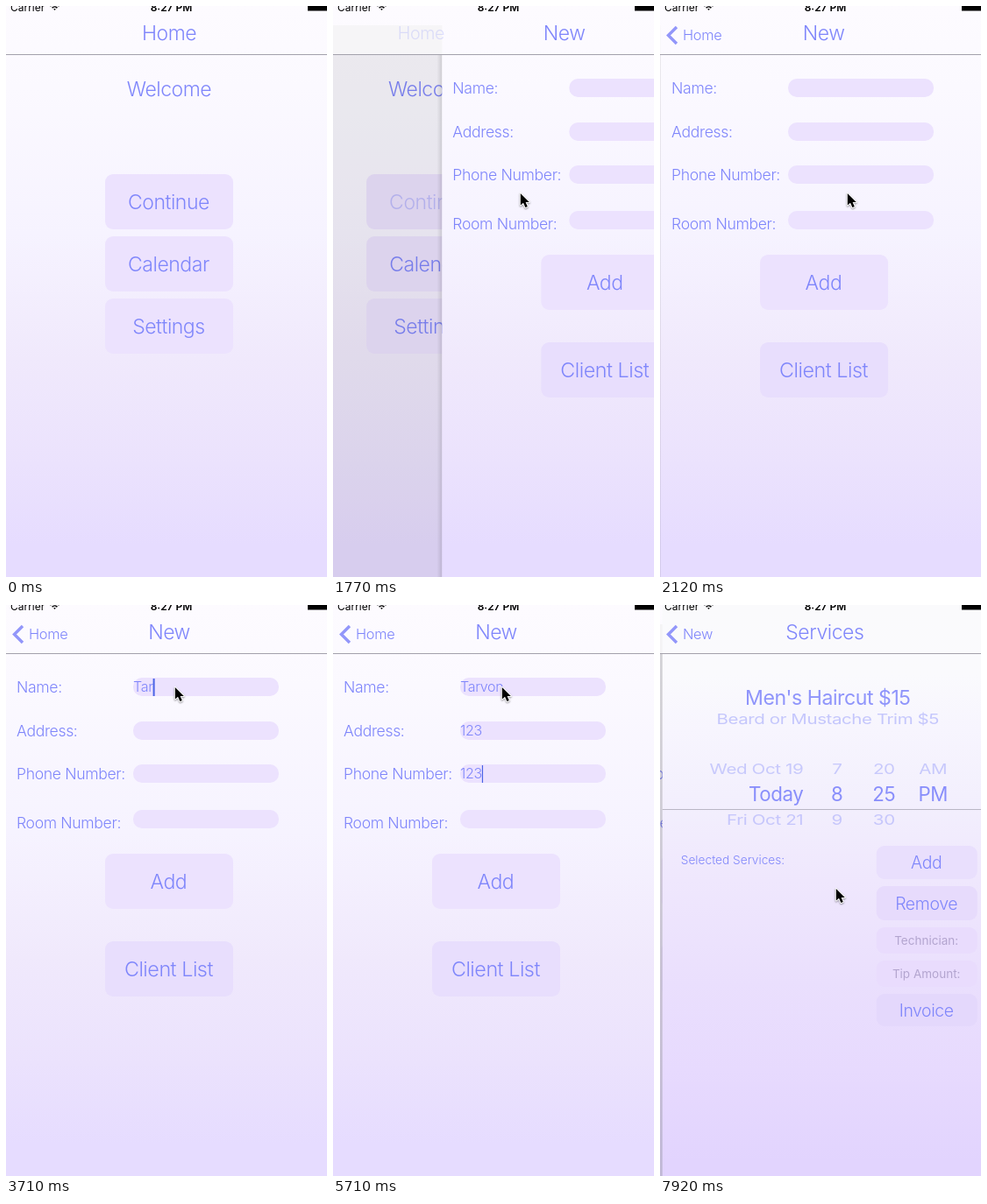
Animation, 366 px wide and 652 px high, one loop 8 s. Source, as an HTML page with a canvas:

```html
<!DOCTYPE html>
<html lang="en">
<head>
<meta charset="utf-8">
<title>Booking app</title>
<style>
html, body { margin: 0; width: 100%; height: 100%; overflow: hidden; background: #fcfaff; }
canvas { display: block; width: 366px; height: 652px; }
</style>
</head>
<body>
<canvas id="stage" width="366" height="652"></canvas>
<script>
const W = 366, H = 652, LOOP = 8000, SCREEN = 375;
const ctx = document.getElementById('stage').getContext('2d');
const INK = '#7f86fb', FILL = '#ece2fe';
const clamp = v => Math.max(0, Math.min(1, v));

const STEP = 87.8, PHASE = 715;
const tick = t => PHASE + STEP * Math.floor((t - PHASE + 1) / STEP);

const PUSH_NEW = 1583.5, PUSH_SERVICES = 7442;

// Remaining distance of a pushed page, settling like a damped spring.
function pushX(ms) {
  if (ms <= 0) return SCREEN;
  const u = ms * 0.0186;
  return SCREEN * (1 + u + u * u / 2) * Math.exp(-u);
}

function gradient(stops) {
  const g = ctx.createLinearGradient(0, 0, 0, H);
  for (const [y, color] of stops) g.addColorStop(y / H, color);
  return g;
}
const LILAC = gradient([[0, '#fdfbff'], [92, '#fbf9ff'], [260, '#f6f3ff'],
  [403, '#f0e9fc'], [524, '#ebe2fd'], [616, '#e6dcff']]);
const VIOLET = gradient([[0, '#fafafc'], [80, '#fafafd'], [142, '#f7f5fe'], [216, '#f3f0fd'],
  [315, '#efe7fd'], [432, '#eadffd'], [530, '#e7dafe'], [635, '#e2d4fe']]);

function text(str, x, y, size, o = {}) {
  ctx.save();
  ctx.font = `${o.weight || 300} ${size}px Inter, "Open Sans", sans-serif`;
  ctx.letterSpacing = (o.track ?? -0.02) * size + 'px';
  ctx.textAlign = o.align || 'center';
  ctx.fillStyle = o.color || INK;
  ctx.globalAlpha *= o.alpha ?? 1;
  ctx.translate(x, y);
  ctx.scale(1, o.squash || 1);
  ctx.fillText(str, 0, size * 0.364);
  const width = ctx.measureText(str).width;
  ctx.restore();
  return width;
}

function pill(x, y, w, h, r, color = FILL) {
  ctx.fillStyle = color;
  ctx.beginPath();
  ctx.roundRect(x, y, w, h, r);
  ctx.fill();
}

function button(label, x, y, w, h, size, o = {}) {
  pill(x, y, w, h, 9, o.fill);
  text(label, x + w / 2 - 0.6, y + h / 2, size, o);
}

function backdrop(fill) {
  ctx.fillStyle = fill;
  ctx.fillRect(0, 0, SCREEN, H);
}

function home(t) {
  backdrop(LILAC);
  text('Welcome', 186, 95, 23);
  button('Continue', 113, 192, 146, 63, 23, { alpha: t >= 1430 ? 0.4 : 1 });
  button('Calendar', 113, 263, 146, 63, 23);
  button('Settings', 113, 334, 146, 63, 23);
}

const FIELDS = [
  { label: 'Name:', y: 93.5, value: 'Tarvon', on: 3010, off: 4480, caret: 2,
    keys: [3280, 3630, 3710, 3860, 3940, 4120] },
  { label: 'Address:', y: 143.5, value: '123', on: 4480, off: 5270, caret: 1.5,
    keys: [4830, 4830, 5010] },
  { label: 'Phone Number:', y: 192.5, value: '123', on: 5270, off: 6070, caret: 1.2,
    keys: [5540, 5630, 5710] },
  { label: 'Room Number:', y: 244.5, drop: 4, value: '123', on: 6070, off: 6800, caret: 1.2,
    keys: [6240, 6420, 6510] }
];

function client(t) {
  backdrop(LILAC);
  for (const f of FIELDS) {
    text(f.label, 12, f.y + (f.drop || 0), 17.6, { align: 'left' });
    pill(145, f.y - 10.5, 166, 21, 10);
    const typed = f.value.slice(0, f.keys.filter(k => t >= k).length);
    const w = text(typed, 145, f.y, 16, { align: 'left' });
    if (t >= f.on && t < f.off) {
      ctx.fillStyle = '#4a63e6';
      ctx.fillRect(145 + w, f.y - 9.5, f.caret, 20);
    }
  }
  button('Add', 113, 284, 146, 63, 23, { alpha: t >= 7300 ? 0.25 : 1 });
  button('Client List', 113, 384, 146, 63, 23.3, { fill: '#e8defd' });
}

const REELS = [
  ['Wed Oct 19', 'Today', 'Fri Oct 21', 160.5, 'right'],
  ['7', '8', '9', 199, 'center'],
  ['20', '25', '30', 252.5, 'center'],
  ['AM', 'PM', '', 308.5, 'center']
];

function services() {
  backdrop(VIOLET);
  text("Men's Haircut $15", 188.5, 106, 23.1, { weight: 400, alpha: 0.88 });
  text('Beard or Mustache Trim $5', 188.5, 130, 20.5, { weight: 400, squash: 0.8, alpha: 0.42 });

  ctx.save();
  ctx.beginPath();
  ctx.rect(0, 170, SCREEN, 82);
  ctx.clip();
  for (const [above, now, below, x, align] of REELS) {
    const side = { align, weight: 400, squash: 0.8, alpha: 0.38 };
    text(above, x, 187, 20.6, side);
    text(now, x, 216, 22.3, { align, weight: 400, alpha: 0.92 });
    text(below, x, 245.5, 20.6, side);
  }
  ctx.restore();
  ctx.fillStyle = '#b9b6c4';
  ctx.fillRect(0, 233, SCREEN, 1);

  text('Selected Services:', 21, 291.5, 13.7, { align: 'left', track: 0 });
  const hint = { fill: '#e9dcfd', color: '#b3a5cf', weight: 400, track: 0 };
  button('Add', 244, 275, 115, 38, 19.5, { fill: '#e9dffd' });
  button('Remove', 244, 321, 115, 39, 19.5, { fill: '#e7dbfc' });
  button('Technician:', 244, 368, 115, 30, 13.5, hint);
  button('Tip Amount:', 244, 406, 115, 30, 13.5, hint);
  button('Invoice', 244, 444, 115, 37, 19.4, { fill: '#e4d8fc' });
}

function back(label, alpha) {
  ctx.save();
  ctx.globalAlpha = alpha;
  ctx.strokeStyle = '#9296fa';
  ctx.lineWidth = 3.4;
  ctx.beginPath();
  ctx.moveTo(19, 24);
  ctx.lineTo(9.5, 33.5);
  ctx.lineTo(19, 43);
  ctx.stroke();
  text(label, 26, 33.5, 16.4, { align: 'left' });
  ctx.restore();
}

function shifted(x, draw, t) {
  ctx.save();
  ctx.translate(x, 0);
  draw(t);
  ctx.restore();
}

const PAGES = [
  { title: 'Home', draw: home },
  { title: 'New', draw: client, prev: 'Home' },
  { title: 'Services', draw: services, prev: 'New' }
];

function still(page, t) {
  page.draw(t);
  text(page.title, 186, 31, 23);
  if (page.prev) back(page.prev, 1);
}

function push(from, to, x, t) {
  const p = 1 - x / SCREEN, edge = clamp(x / 3);
  shifted(-112 * p, from.draw, t);
  ctx.fillStyle = `rgba(0,0,0,${0.1 * p * edge})`;
  ctx.fillRect(0, 55, W, H);
  ctx.fillStyle = `rgba(243,243,244,${p * edge})`;
  ctx.fillRect(0, 22, W, 33);
  if (from.prev) back(from.prev, clamp(1 - 2 * p));

  const shade = ctx.createLinearGradient(x - 6, 0, x, 0);
  shade.addColorStop(0, 'rgba(0,0,0,0)');
  shade.addColorStop(1, `rgba(0,0,0,${0.12 * edge})`);
  ctx.fillStyle = shade;
  ctx.fillRect(x - 6, 55, 6, H);

  shifted(x, to.draw, t);
  // The old title shrinks and fades towards the back label.
  text(from.title, 186 - 128 * p, 31, 23 - 5 * p, { alpha: clamp(1 - 1.15 * p) });
  text(to.title, 186 + 0.65 * x * p ** 0.1, 31, 23);
  back(to.prev, clamp((p - 0.7) / 0.28));
}

function statusBar() {
  const o = { color: '#000', weight: 400, track: 0 };
  text('Carrier', 5, 1.5, 12, { ...o, align: 'left' });
  text('8:27 PM', 188.5, 1.5, 12, { ...o, weight: 600 });
  ctx.fillStyle = '#000';
  ctx.fillRect(344, 0, 22, 5.5);
  ctx.strokeStyle = '#000';
  ctx.lineWidth = 1.6;
  for (const r of [1, 4, 7]) {
    ctx.beginPath();
    ctx.arc(55.5, 5, r, -Math.PI * 0.76, -Math.PI * 0.24);
    ctx.stroke();
  }
  ctx.fillStyle = '#a3a1ab';
  ctx.fillRect(0, 55, W, 1);
}

const PATH = [
  [715, 329, 286], [898, 329, 286], [1159, 213, 213], [2120, 213, 213], [2208, 211, 172],
  [2295, 197, 112], [2383, 192, 93], [6590, 192, 93], [6850, 203, 190], [7205, 200, 323]
];

function pointer(t) {
  if (t < PATH[0][0]) return;
  let [, x, y] = PATH[PATH.length - 1];
  const i = PATH.findIndex(p => p[0] > t);
  if (i > 0) {
    const [t0, x0, y0] = PATH[i - 1], [t1, x1, y1] = PATH[i];
    const k = (t - t0) / (t1 - t0);
    x = x0 + (x1 - x0) * k;
    y = y0 + (y1 - y0) * k;
  }
  ctx.save();
  ctx.translate(x + 0.8, y + 1);
  ctx.beginPath();
  for (const [px, py] of [[0, 0], [0, 13.6], [3.2, 10.7], [5.6, 16], [8, 15], [5.8, 10], [10, 10]])
    ctx.lineTo(px, py);
  ctx.closePath();
  ctx.lineJoin = 'round';
  ctx.strokeStyle = '#fff';
  ctx.lineWidth = 2;
  ctx.shadowColor = 'rgba(0,0,0,0.4)';
  ctx.shadowBlur = 2;
  ctx.shadowOffsetY = 1;
  ctx.stroke();
  ctx.shadowColor = 'transparent';
  ctx.fillStyle = '#000';
  ctx.fill();
  ctx.restore();
}

function draw(t) {
  const s = tick(t), [first, second, third] = PAGES;
  ctx.clearRect(0, 0, W, H);
  if (s < PUSH_NEW) still(first, t);
  else if (s < 2200) push(first, second, pushX(s - PUSH_NEW), t);
  else if (t < 7828) still(second, t);
  else push(second, third, pushX(s - PUSH_SERVICES), t);
  statusBar();
  pointer(s);
}

function frame(now) {
  draw(now % LOOP);
  requestAnimationFrame(frame);
}
requestAnimationFrame(frame);
</script>
</body>
</html>
```
